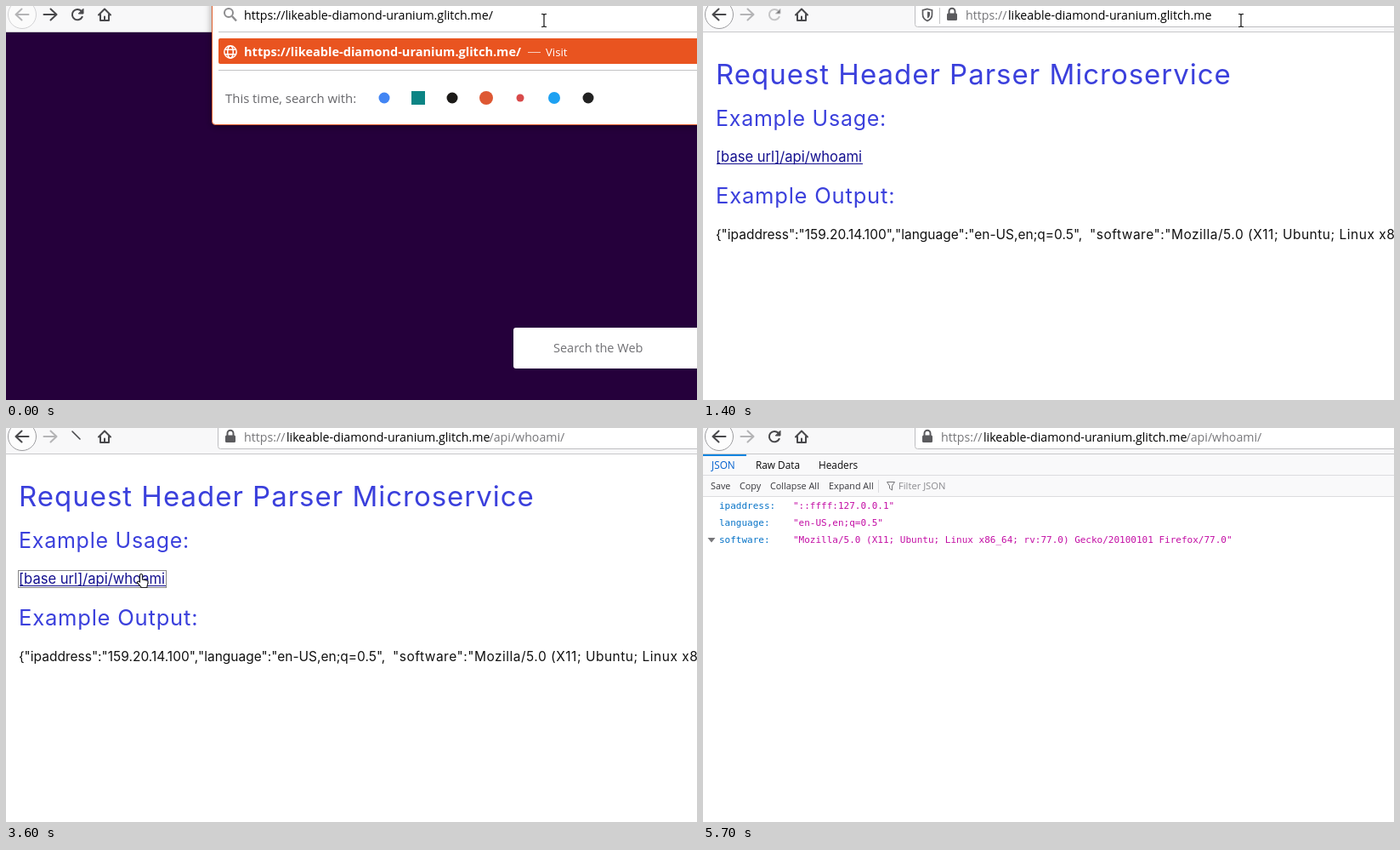
Animation of 813 by 463 pixels, one loop 6900 ms. Source, as an HTML page:

```html
<!DOCTYPE html>
<html lang="en">
<head>
<meta charset="utf-8">
<title>Request header parser demo</title>
<style>
html, body { margin: 0; height: 100%; overflow: hidden; background: #fff; }
svg { display: block; width: 813px; height: 463px; }
text { font-family: "Open Sans", sans-serif; white-space: pre; }
.url { font-size: 14.2px; fill: #000; }
.page text { font-family: Inter, sans-serif; font-optical-sizing: none; }
.page .title { fill: #3b40dc; letter-spacing: .03em; }
.tabs { font-size: 11.8px; fill: #0c0c0d; }
.tools { font-size: 10.8px; fill: #38383d; }
.json text { font: 11px "DejaVu Sans Mono", monospace; fill: #c30da4; }
.json .key { fill: #0874c8; }
.icon { fill: none; stroke: #48484b; stroke-width: 2; stroke-linecap: round; stroke-linejoin: round; }
.dim { stroke: #b4b4b6; }
.grey { fill: #77777a; }
.pointer { fill: #111; stroke: #fff; stroke-width: 1; }
</style>
</head>
<body>
<svg viewBox="0 0 813 463">
  <defs>
    <path id="arrow" d="M-7.5 0H7.5M.5-6.5L7.5 0L.5 6.5"/>
    <g id="reload">
      <path d="M89.7 12.8A6.2 6.2 0 1 1 88.6 5.8"/>
      <path d="M91 3.6V9H85.6Z" fill="#48484b" stroke-width="1"/>
    </g>
    <g id="lock">
      <rect x="-6" y="-1" width="12" height="8.5" rx="1.5" fill="#5b5b5e"/>
      <path d="M-3.5 0V-3.2A3.5 3.5 0 0 1 3.5-3.2V0" fill="none" stroke="#5b5b5e" stroke-width="2"/>
    </g>
    <g id="lens" fill="none" stroke="#8c8c8e" stroke-width="2">
      <circle cx="262" cy="8" r="5"/><path d="M266 12L271 17.5" stroke-width="2.4"/>
    </g>
    <filter id="shadow" x="-10%" y="-20%" width="120%" height="150%">
      <feDropShadow dx="0" dy="2" stdDeviation="4" flood-opacity=".4"/>
    </filter>
  </defs>

  <!-- start page -->
  <g data-on="0 1400">
    <rect y="31" width="813" height="432" fill="#25003b"/>
    <rect x="597" y="378" width="220" height="48" rx="3" fill="#fff"/>
    <text x="644" y="407" font-size="14.5" fill="#707074">Search the Web</text>
  </g>

  <!-- service page -->
  <g class="page" data-on="1400 3700">
    <text class="title" x="15" y="92" font-size="33">Request Header Parser Microservice</text>
    <text class="title" x="15" y="141" font-size="25">Example Usage:</text>
    <text x="15" y="183" font-size="16.6" fill="#14108f">[base url]/api/whoami</text>
    <path d="M16 185.5H188" stroke="#14108f"/>
    <text class="title" x="15" y="232" font-size="25.6">Example Output:</text>
    <text x="15" y="274" font-size="15.5" fill="#111">{"ipaddress":"159.20.14.100",<tspan x="226">"language":"en-US,en;q=0.5",</tspan><tspan x="455" letter-spacing=".5">"software":"Mozilla/5.0 (X11; Ubuntu; Linux x86_64; rv:77.0)</tspan></text>
    <rect data-on="3400 3700" x="14.5" y="167.5" width="174" height="20" fill="none" stroke="#111" stroke-dasharray="1 1"/>
  </g>

  <!-- JSON viewer -->
  <g data-on="3800 6900">
    <rect y="31" width="813" height="50" fill="#f9f9fa"/>
    <path d="M0 55.5H813M0 80.5H813M206.5 61V76" stroke="#dcdcdf"/>
    <rect y="31" width="51" height="2" fill="#0a84e0"/>
    <g class="tabs">
      <text x="10" y="48" fill="#0060cf">JSON</text>
      <text x="62" y="48">Raw Data</text>
      <text x="136" y="48">Headers</text>
    </g>
    <g class="tools">
      <text x="9" y="72">Save</text>
      <text x="43" y="72">Copy</text>
      <text x="79" y="72">Collapse All</text>
      <text x="148" y="72">Expand All</text>
      <text x="230" y="72" font-size="11.2" fill="#8c8c90">Filter JSON</text>
    </g>
    <path d="M216.5 63.5H225.5L222.5 68V73L219.5 71V68Z" fill="none" stroke="#77777a"/>
    <rect id="hover" x="2" width="621" height="20" fill="#f0f9fe"/>
    <g class="json">
      <text class="key" x="19" y="95">ipaddress:</text><text x="106" y="95">"::ffff:127.0.0.1"</text>
      <text class="key" x="19" y="115">language:</text><text x="106" y="115">"en-US,en;q=0.5"</text>
      <text class="key" x="19" y="135">software:</text><text x="106" y="135">"Mozilla/5.0 (X11; Ubuntu; Linux x86_64; rv:77.0) Gecko/20100101 Firefox/77.0"</text>
    </g>
    <path d="M5.5 129H14.5L10 134.5Z" fill="#77777a"/>
  </g>

  <!-- toolbar -->
  <rect width="813" height="30" fill="#f8f8f9"/>
  <path d="M0 30.5H813" stroke="#c8c8ca"/>
  <circle cx="19" cy="10" r="16.5" fill="#fbfbfb" stroke="#d2d2d4" data-on="0 1300"/>
  <circle cx="19" cy="10" r="16.5" fill="#fdfdfd" stroke="#9c9c9f" data-on="1300 6900"/>
  <g class="icon">
    <use href="#arrow" transform="translate(19 10) scale(-1 1)" class="dim" data-on="0 1300"/>
    <use href="#arrow" transform="translate(19 10) scale(-1 1)" data-on="1300 6900"/>
    <use href="#arrow" x="52" y="10" data-on="0 1300"/>
    <use href="#arrow" x="52" y="10" class="dim" data-on="1300 6900"/>
    <use href="#reload" data-on="0 1000 2000 3500 4300 6900"/>
    <use href="#reload" class="dim" opacity=".75" data-on="1400 2000 3700 4300"/>
    <path d="M78 4.5L90 16.5M90 4.5L78 16.5" stroke-width="1.7" data-on="1000 1400 3500 3600"/>
    <path d="M78 4L87 13" stroke-width="1.6" data-on="3600 3700"/>
    <path d="M109 10.5L116 3.5L123 10.5M111 10V17H121V10M116 17V12.5"/>
  </g>

  <!-- address bar -->
  <g data-on="1000 6900">
    <rect x="249.5" y="-10" width="580" height="34.5" rx="3" fill="#fff" stroke="#bdbdc0"/>
    <g data-on="1000 1300">
      <use href="#lens"/>
      <text class="url" x="280" y="16"><tspan class="grey">https://</tspan><tspan x="330">likeable-diamond-uranium.glitch.me</tspan><tspan class="grey">/</tspan></text>
    </g>
    <g data-on="1300 3500">
      <path d="M264 3.5L269.5 5V10Q269.5 15 264 17.5Q258.5 15 258.5 10V5Z" fill="none" stroke="#5b5b5e" stroke-width="1.7"/>
      <path d="M264 6.5L267 7.3V10Q267 13 264 14.5Z" fill="#5b5b5e"/>
      <path d="M278.5 2V21" stroke="#c4c4c6"/>
      <use href="#lock" x="293" y="9.5"/>
      <text class="url" x="309" y="16"><tspan class="grey">https://</tspan><tspan x="359">likeable-diamond-uranium.glitch.me</tspan></text>
    </g>
    <g data-on="3500 6900">
      <use href="#lock" x="264" y="9.5"/>
      <text class="url" x="280" y="16"><tspan class="grey">https://</tspan><tspan x="330">likeable-diamond-uranium.glitch.me</tspan><tspan class="grey" x="568.5">/api/whoami/</tspan></text>
    </g>
  </g>

  <!-- suggestions -->
  <g data-on="0 1000">
    <rect x="242.5" y="-20" width="600" height="159.5" rx="4" fill="#fff" stroke="#e0602f" filter="url(#shadow)"/>
    <use href="#lens"/>
    <text class="url" x="280" y="16">https://likeable-diamond-uranium.glitch.me/</text>
    <path d="M250 30.5H813M250 75.5H813" stroke="#c3c3c5"/>
    <rect x="250" y="38" width="570" height="30" rx="2" fill="#e95420"/>
    <g fill="none" stroke="#fff" stroke-width="1.5">
      <circle cx="264" cy="54" r="7.2"/>
      <ellipse cx="264" cy="54" rx="3.3" ry="7.2"/>
      <path d="M257.5 51.3H270.5M257.5 56.7H270.5"/>
    </g>
    <g fill="#fff">
      <text x="280" y="59" font-size="14.55" font-weight="700">https://likeable-diamond-uranium.glitch.me/</text>
      <rect x="614" y="54" width="15" height="1" opacity=".7"/>
      <text x="635" y="59" font-size="13.2">Visit</text>
    </g>
    <text x="258" y="114" font-size="14.9" fill="#66666a">This time, search with:</text>
    <circle cx="445" cy="108" r="6.5" fill="#4285f4"/>
    <rect x="477" y="100" width="16" height="16" fill="#0c8484"/>
    <circle cx="525" cy="108" r="6.5" fill="#1c1a18"/>
    <circle cx="565" cy="108" r="8" fill="#de5833"/>
    <circle cx="605" cy="108" r="4.5" fill="#d84a4a"/>
    <circle cx="645" cy="108" r="7" fill="#1da1f2"/>
    <circle cx="685" cy="108" r="6.5" fill="#222"/>
  </g>

  <!-- mouse pointer shapes -->
  <g id="mouse">
    <g id="beam" fill="none">
      <path d="M-3-7.5H-1L0-6.5L1-7.5H3M0-6.5V6.5M-3 7.5H-1L0 6.5L1 7.5H3" stroke="#fff" stroke-width="3"/>
      <path d="M-3-7.5H-1L0-6.5L1-7.5H3M0-6.5V6.5M-3 7.5H-1L0 6.5L1 7.5H3" stroke="#111" stroke-width="1.2"/>
    </g>
    <path id="tip" class="pointer" d="M0-1V15L3.5 11.7L6 17.5L8.5 16.4L6 10.8H10.5Z"/>
    <path id="hand" d="M2.5 9V.5Q4-1.5 5.5.5V6L11 7.2Q12.5 7.7 12 10L10.8 15.5H4.3L-.8 9.5Q-.2 7.3 2.5 9Z" fill="#fff" stroke="#222" stroke-width="1.2"/>
  </g>
</svg>
<script>
const LOOP = 6900, STEP = 100;
// time, x, y, easing power on the way here
const path = [
  [0, 633, 17, 1], [2200, 633, 17, 1], [2600, 519, 107, 2], [2900, 234, 171, 1],
  [3000, 234, 171, 1], [3400, 155, 172, 1], [5000, 155, 172, 1], [5700, 200, -30, 1.4], [LOOP, 200, -30, 1]
];
const byId = id => document.getElementById(id);
const show = (el, on) => { el.style.display = on ? '' : 'none'; };
const timed = [...document.querySelectorAll('[data-on]')].map(el => [el, el.dataset.on.split(' ').map(Number)]);

function mouseAt(t) {
  const i = path.findIndex(key => key[0] > t);
  const [t0, x0, y0] = path[i - 1], [t1, x1, y1, power] = path[i];
  const u = ((t - t0) / (t1 - t0)) ** power;
  return [x0 + (x1 - x0) * u, y0 + (y1 - y0) * u];
}

function draw() {
  const t = Math.floor(performance.now() % LOOP / STEP) * STEP;
  for (const [el, times] of timed) show(el, times.filter(edge => edge <= t).length % 2);

  const [x, y] = mouseAt(t);
  const shape = t < 3000 && y < 30 ? 'beam' : t < 3700 && x < 188 ? 'hand' : 'tip';
  for (const id of ['beam', 'tip', 'hand']) show(byId(id), id === shape);
  byId('mouse').setAttribute('transform', `translate(${Math.round(x)} ${Math.round(y)})`);

  const row = Math.floor((y - 81) / 20);
  show(byId('hover'), row >= 0 && row < 3);
  byId('hover').setAttribute('y', 81 + row * 20);
  requestAnimationFrame(draw);
}
draw();
</script>
</body>
</html>
```
